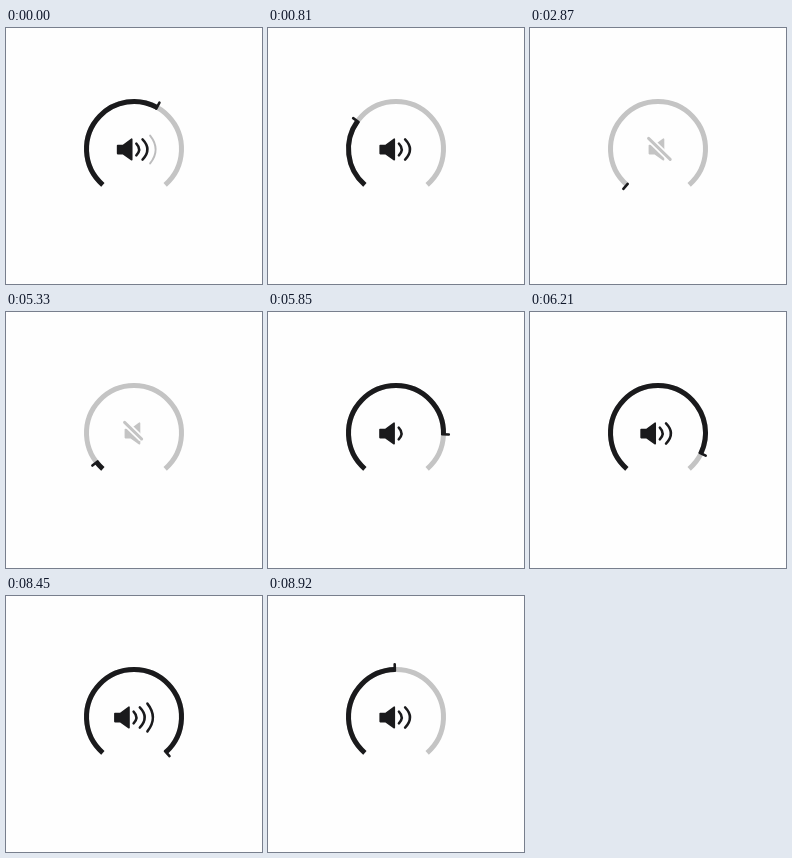
Recreate the animation shown at these times as an HTML page. Size 256 by 256 pixels, loop 9020 ms.

```html
<!DOCTYPE html>
<html lang="en">
<head>
<meta charset="utf-8">
<title>Volume dial</title>
<style>
  html, body { margin: 0; width: 100%; height: 100%; overflow: hidden; background: #fefefe; }
  svg { display: block; width: 100%; height: 100%; }
  path, line { fill: none; }
</style>
</head>
<body>
<svg viewBox="0 0 256 256">
  <g stroke-width="5">
    <path class="ring" stroke="#c4c4c4"/>
    <path class="ring" id="fill" stroke="#1a1a1c" pathLength="1000"/>
  </g>
  <line id="tick" x1="128" y1="74.8" x2="128" y2="68.2" stroke="#1a1a1c" stroke-width="2.6" stroke-linecap="round"/>
  <g id="icon">
    <path id="speaker" stroke-width="1.6" stroke-linejoin="round"
      d="M.9 117.6H6.2L15 111.2V131.8L6.2 125.6H.9Z"/>
    <g stroke="#1a1a1c" stroke-linecap="round">
      <path class="wave" d="M19.6 115.6Q25.2 121.5 19.6 127.4"/>
      <path class="wave" d="M25.8 111.4Q35.6 121.5 25.8 131.6"/>
      <path class="wave" d="M33.4 107.6Q44.4 121.5 33.4 135.4"/>
    </g>
  </g>
  <line id="gap" stroke="#fefefe" stroke-width="6.4"/>
  <line id="slash" stroke="#c4c4c4" stroke-width="3" stroke-linecap="round"/>
</svg>
<script>
const LOOP = 9020, STEP = 57.2;
const RISE = 5265, FALL = 8403, FALL_LEAD = 447;
const SWEEP = 139, CX = 128, CY = 121, R = 47.5;

const $ = id => document.getElementById(id);
const set = (el, attrs) => { for (const k in attrs) el.setAttribute(k, attrs[k]); };
const ramp = (t, a, b) => Math.min(1, Math.max(0, (t - a) / (b - a)));
const ease = (t, a, b) => { const u = ramp(t, a, b); return u * u * (3 - 2 * u); };

const sn = R * Math.sin(SWEEP * Math.PI / 180), cs = R * Math.cos(SWEEP * Math.PI / 180);
const waves = document.querySelectorAll('.wave');
document.querySelectorAll('.ring').forEach(el =>
  set(el, { d: `M${CX - sn} ${CY - cs}A${R} ${R} 0 1 1 ${CX + sn} ${CY - cs}` }));

// Constant acceleration from 0 to 1, then rebounds that shrink by `bounce`.
function drop(t, kick, accel, bounce) {
  if (t <= 0) return 0;
  let speed = Math.sqrt(kick * kick + 4 * accel);
  const hit = (speed - kick) / (2 * accel);
  if (t < hit) return kick * t + accel * t * t;
  t -= hit;
  for (speed *= bounce; speed / accel > 12; speed *= bounce) {
    const span = speed / accel;
    if (t < span) return 1 - speed * t + accel * t * t;
    t -= span;
  }
  return 1;
}

function falling(t) {
  return {
    level: 1 - drop(t, 0, 1 / (710 * 710), 0.58),
    x: 108 + 3.3 * ease(t, 300, 500) + 3.7 * ease(t, 1530, 1830) + 3.5 * ease(t, 2480, 2780),
    waves: [1 - ramp(t, 2450, 2650), 1 - ramp(t, 1480, 1700), 1 - ramp(t, 340, 490)],
    mute: ramp(t, 2500, 2780),
    slash: ease(t, 2700, 3200)
  };
}

function rising(t) {
  return {
    level: drop(t, 0.000504, 1.598e-6, 0.29),
    x: 118.5 - 3.5 * ease(t, 130, 330) - 3.9 * ease(t, 360, 570) - 3.1 * ease(t, 800, 1150),
    waves: [ramp(t, 230, 430), ramp(t, 590, 800), ramp(t, 1040, 1360)],
    mute: 1 - ramp(t, 180, 330),
    slash: 1 - ramp(t, 0, 310)
  };
}

function state(ms) {
  const start = ms < 5330 ? 0 : ms < 8450 ? 5330 : 8450;
  let t = start + Math.floor((ms - start) / STEP) * STEP;
  if (start === 8450) t = Math.min(t, 8450 + 8 * STEP);
  if (start === 0) return falling(t + FALL_LEAD);
  return start === 5330 ? rising(t - RISE) : falling(t - FALL);
}

function draw(ms) {
  const s = state(ms);
  set($('fill'), {
    'stroke-dasharray': `${s.level * 1000} 2000`,
    visibility: s.level > 0.001 ? 'visible' : 'hidden'
  });
  set($('tick'), { transform: `rotate(${SWEEP * (2 * s.level - 1)} ${CX} ${CY})` });
  set($('icon'), { transform: `translate(${s.x} 0)` });

  const mix = (a, b) => Math.round(a + (b - a) * s.mute);
  const ink = `rgb(${mix(26, 196)},${mix(26, 196)},${mix(28, 196)})`;
  $('speaker').style.fill = ink;
  set($('speaker'), { stroke: ink });
  waves.forEach((el, i) => set(el, {
    opacity: s.waves[i],
    'stroke-width': 1.7 + 0.8 * s.waves[i]
  }));

  const end = { x2: 118.6 + 21.6 * s.slash, y2: 110.4 + 21 * s.slash };
  const visibility = s.slash > 0.01 ? 'visible' : 'hidden';
  for (const id of ['gap', 'slash']) set($(id), { x1: 118.6, y1: 110.4, ...end, visibility });
}

function tick() {
  draw(performance.now() % LOOP);
  requestAnimationFrame(tick);
}
tick();
</script>
</body>
</html>
```
